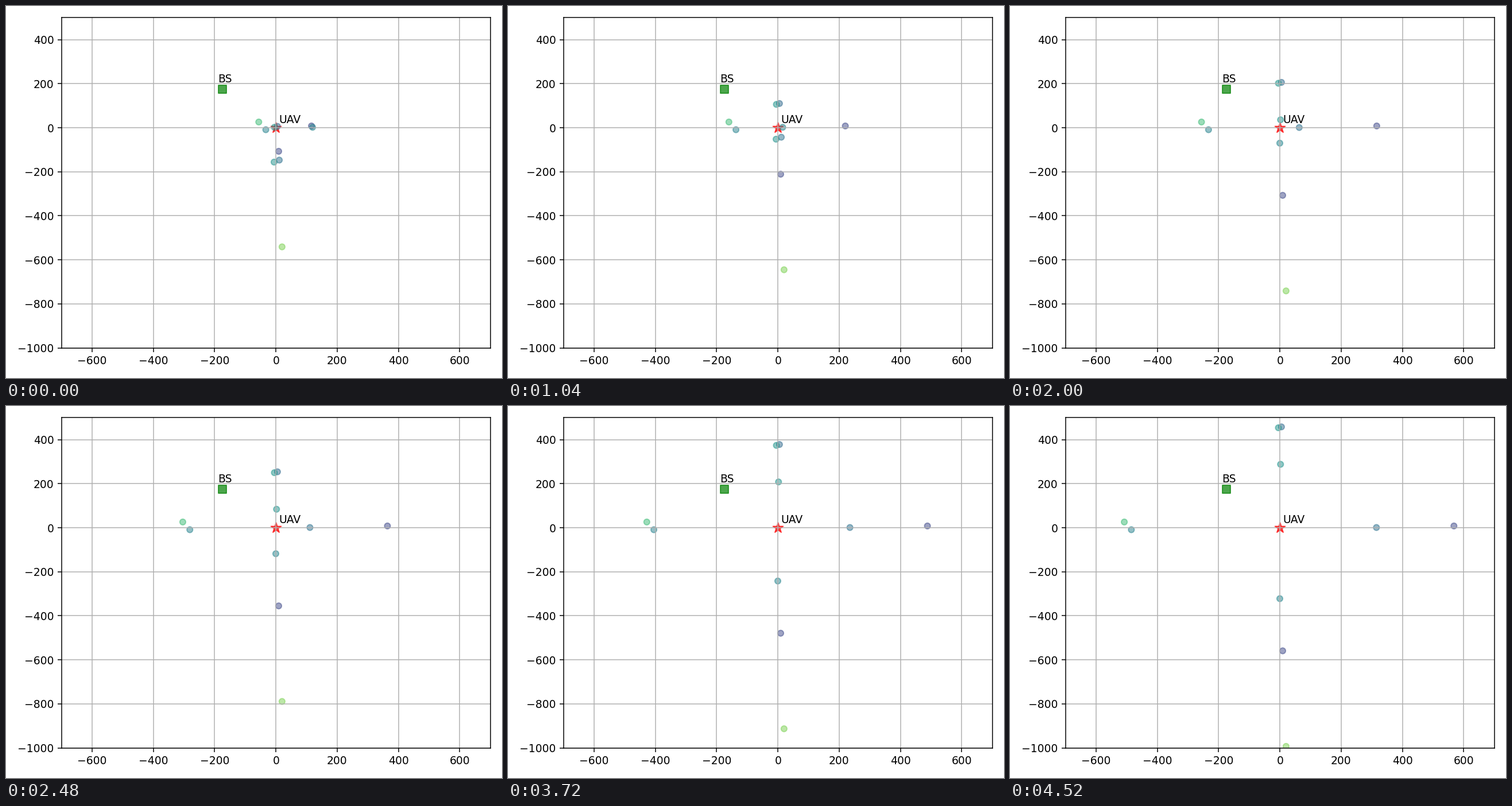
Write a matplotlib script that moves like this. It is 864 by 648 pixels and loops after 4560 ms.

```python
import matplotlib.pyplot as plt
import numpy as np
from matplotlib.animation import FuncAnimation

FRAMES, INTERVAL = 114, 40
STEP = 4  # distance per frame
LEFT, RIGHT, UP, DOWN = (-1, 0), (1, 0), (0, 1), (0, -1)

# start x, start y, colour value, (first frame, heading) legs
VEHICLES = [
    (-56, 26, 0.68, [(0, LEFT)]),
    (-33, -9, 0.44, [(0, LEFT)]),
    (5, 6, 0.34, [(0, UP)]),
    (-5, 2, 0.52, [(0, UP)]),
    (116, 8, 0.22, [(0, RIGHT)]),
    (9, -107, 0.22, [(0, DOWN)]),
    (20, -541, 0.80, [(0, DOWN)]),
    (119.6, 2, 0.45, [(0, LEFT), (30, RIGHT), (31, LEFT), (32, DOWN)]),
    (11, -147, 0.37, [(0, UP), (37, RIGHT)]),
    (-6, -156, 0.51, [(0, UP), (39, RIGHT), (41, UP)]),
]


def position(x, y, legs, frame):
    ends = [start for start, _ in legs[1:]] + [FRAMES]
    for (start, (dx, dy)), end in zip(legs, ends):
        travelled = STEP * max(0, min(frame, end) - start)
        x += dx * travelled
        y += dy * travelled
    return x, y


def positions(frame):
    return np.array([position(x, y, legs, frame) for x, y, _, legs in VEHICLES])


fig, ax = plt.subplots(figsize=(6.4, 4.8), dpi=135)
ax.set_xlim(-700, 700)
ax.set_ylim(-1000, 500)
ax.grid(True)

ax.scatter(-175, 175, s=60, c="green", marker="s", alpha=0.7)
ax.scatter(0, 0, s=100, c="red", marker="*", alpha=0.7)
ax.text(-190, 205, "BS")
ax.text(10, 20, "UAV")

start = positions(0)
dots = ax.scatter(start[:, 0], start[:, 1], s=30, alpha=0.5,
                  c=[v[2] for v in VEHICLES], cmap="viridis", vmin=0, vmax=1)
fig.tight_layout()


def update(frame):
    dots.set_offsets(positions(frame))
    return (dots,)


anim = FuncAnimation(fig, update, frames=FRAMES, interval=INTERVAL,
                     repeat=True, repeat_delay=0, blit=False)
plt.show()
```
